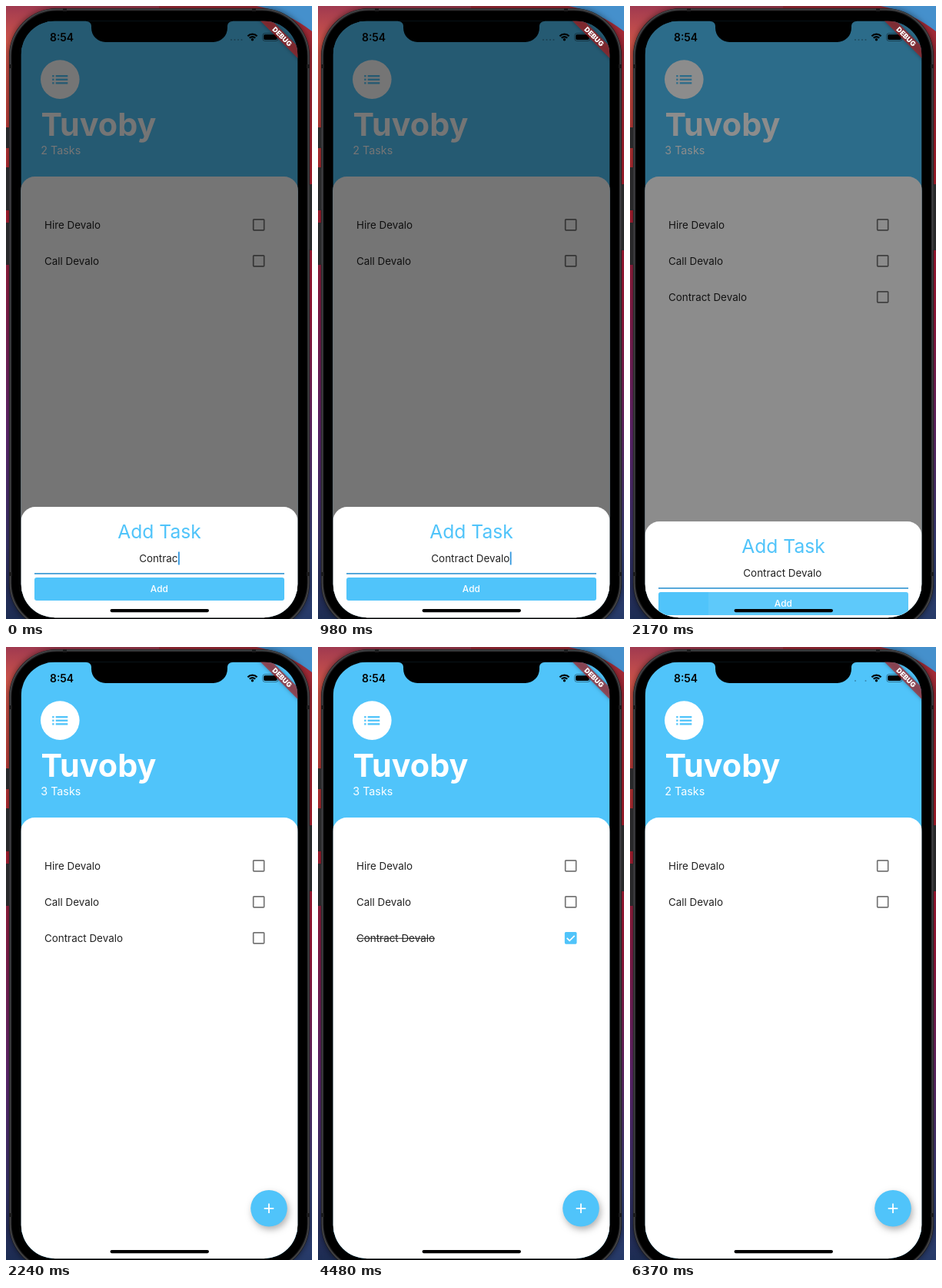
An HTML page with a canvas that plays this animation: 398 px wide and 798 px high, repeating every 6.58 s.

```html
<!DOCTYPE html>
<html lang="en">
<head>
<meta charset="utf-8">
<title>Task list</title>
<style>
  html, body { margin: 0; width: 100%; height: 100%; overflow: hidden; background: #000; }
  canvas { display: block; width: 398px; height: 798px; }
</style>
</head>
<body>
<canvas id="stage" width="398" height="798"></canvas>
<script>
const ctx = document.getElementById('stage').getContext('2d');
const LOOP = 6580, STEP = 70;
const BLUE = '#50c4fa';
const SCREEN = [19.6, 19.6, 359.8, 776.6];
const CORNER = 18.4;
const TASKS = ['Hire Devalo', 'Call Devalo', 'Contract Devalo'];
const NEW_TASK = TASKS[2];

// [time, number of letters in the field]
const TYPING = [[0, 7], [70, 8], [140, 9], [490, 10], [630, 11], [770, 13], [910, 14], [980, 15]];
const ADDED = 2100, CLOSED = 2240, TICK = 4130, REMOVED = 5950;

const clamp = v => Math.max(0, Math.min(1, v));

function box(x, y, w, h, r, fill) {
  ctx.beginPath();
  ctx.roundRect(x, y, w, h, r);
  if (fill) { ctx.fillStyle = fill; ctx.fill(); }
}

function outline(color, width) {
  ctx.strokeStyle = color;
  ctx.lineWidth = width;
  ctx.stroke();
}

function disc(x, y, r, fill) {
  ctx.beginPath();
  ctx.arc(x, y, r, 0, Math.PI * 2);
  ctx.fillStyle = fill;
  ctx.fill();
}

function line(points, color, width) {
  ctx.beginPath();
  points.forEach(([x, y]) => ctx.lineTo(x, y));
  outline(color, width);
}

function label(str, x, y, size, color, weight = 400, align = 'left') {
  ctx.font = `${weight} ${size}px Inter, "Open Sans", sans-serif`;
  ctx.textAlign = align;
  ctx.fillStyle = color;
  ctx.fillText(str, x, y);
  return ctx.measureText(str).width;
}

function gradient(colors) {
  const g = ctx.createLinearGradient(0, 0, 0, 798);
  colors.forEach(([at, c]) => g.addColorStop(at, c));
  return g;
}

function drawWallpaper() {
  ctx.fillStyle = gradient([
    [0, '#a03a50'], [.06, '#d2564a'], [.18, '#c4423c'], [.32, '#b3202f'],
    [.5, '#8c2050'], [.7, '#662a78'], [.88, '#39356f'], [1, '#1c2c52']]);
  ctx.fillRect(0, 0, 199, 798);
  ctx.fillStyle = gradient([
    [0, '#a02c38'], [.3, '#b81f30'], [.5, '#a81a40'],
    [.68, '#6f2a70'], [.88, '#3a4480'], [1, '#263a68']]);
  ctx.fillRect(199, 0, 199, 798);
  ctx.fillStyle = '#4590cc';
  ctx.beginPath();
  ctx.moveTo(326, 0);
  ctx.lineTo(398, 0);
  ctx.lineTo(398, 33);
  ctx.quadraticCurveTo(366, 8, 326, 0);
  ctx.fill();
}

function drawBody() {
  ctx.save();
  ctx.shadowColor = 'rgba(0,0,0,.55)';
  ctx.shadowBlur = 9;
  box(4, 3, 391, 810, 62, '#161617');
  ctx.restore();
  [[158, 27], [210, 56], [282, 55]].forEach(([y, h]) => box(-3, y, 8, h, 2, '#29292b'));
  box(394, 232, 8, 86, 2, '#29292b');
  box(5.6, 4.6, 387.8, 806.8, 60.4);
  outline('#404043', 2);
  box(7.5, 6.5, 384, 803, 59, '#000');
  ctx.fillStyle = '#1b1b1c';
  [[4, 76], [391, 76], [4, 737], [391, 737]].forEach(([x, y]) => ctx.fillRect(x, y, 4, 5));
  [74, 320].forEach(x => ctx.fillRect(x, 3, 5, 4));
}

function drawStatus(dots) {
  label('8:54', 57, 45.5, 13.9, '#000', 600);
  for (let i = 0; i < 4; i++) {
    if (dots === 'all' || (dots === 'few' && (i === 0 || i === 3))) {
      disc(293 + i * 4.5, 44, 1, 'rgba(0,0,0,.3)');
    }
  }
  [8.6, 5.2].forEach(r => {
    ctx.beginPath();
    ctx.arc(320.5, 45.3, r, -Math.PI * .75, -Math.PI * .25);
    outline('#000', 2.2);
  });
  disc(320.5, 43.8, 1.7, '#000');
  box(333.8, 35.5, 20.2, 10, 3);
  outline('rgba(0,0,0,.4)', 1);
  box(335.2, 36.9, 17.4, 7.2, 1.8, '#000');
}

function drawCheckbox(x, y, progress) {
  const fill = clamp(progress * 2), mark = clamp(progress * 2 - 1);
  box(x - 7, y - 7, 14, 14, .8);
  outline(fill ? BLUE : '#757575', 1.7);
  if (!fill) return;
  const half = 7 * fill;
  ctx.fillStyle = BLUE;
  ctx.fillRect(x - half, y - half, half * 2, half * 2);
  if (mark) {
    const a = clamp(mark * 3), b = clamp(mark * 1.5 - .5);
    const path = [[x - 5, y], [x - 5 + 3.5 * a, y + 3.5 * a]];
    if (b) path.push([x - 1.5 + 6.5 * b, y + 3.5 - 6.5 * b]);
    line(path, '#fff', 1.7);
  }
}

function drawTasks(t) {
  const count = t >= ADDED && t < REMOVED ? 3 : 2;
  label(`${count} Tasks`, 45.3, 193.2, 14.3, '#fff');
  box(19, 222, 361, 600, [CORNER, CORNER, 0, 0], '#fff');
  TASKS.slice(0, count).forEach((task, i) => {
    const y = 284.8 + i * 47;
    const ticking = i === 2 && t >= TICK;
    const since = t - TICK;
    if (ticking && since < 350) {
      const alpha = .12 * clamp((350 - since) / 200);
      disc(328.7, y, 20 * clamp((since + STEP) / 140), `rgba(80,196,250,${alpha})`);
    }
    const width = label(task, 50, y + 4.8, 13.4, '#212121');
    if (ticking && since >= STEP) line([[50, y + .5], [50 + width, y + .5]], '#212121', 1);
    drawCheckbox(328.7, y, ticking ? clamp(since / 210) : 0);
  });
}

function drawApp(t) {
  ctx.fillStyle = BLUE;
  ctx.fillRect(...SCREEN);
  disc(70.3, 95.6, 25.3, '#fff');
  ctx.fillStyle = BLUE;
  [90, 94.6, 99.2].forEach(y => {
    ctx.fillRect(60.2, y, 2.3, 2.3);
    ctx.fillRect(64.7, y, 15.6, 2.3);
  });
  label('Tuvoby', 45.6, 169, 41.3, '#fff', 700);
  drawTasks(t);

  ctx.save();
  ctx.shadowColor = 'rgba(0,0,0,.3)';
  ctx.shadowBlur = 8;
  ctx.shadowOffsetY = 4;
  ctx.shadowOffsetX = 2;
  disc(342, 730.8, 23.8, BLUE);
  ctx.restore();
  line([[335.7, 730.8], [348.3, 730.8]], '#fff', 1.8);
  line([[342, 724.5], [342, 737.1]], '#fff', 1.8);
}

function drawSheet(t) {
  const closing = t > ADDED;
  const typed = TYPING.filter(([at]) => t >= at).pop()[1];
  ctx.fillStyle = `rgba(0,0,0,${closing ? .45 : .54})`;
  ctx.fillRect(...SCREEN);

  ctx.save();
  ctx.translate(0, closing ? 19 : 0);
  box(19.6, 652, 359.8, 170, [CORNER, CORNER, 0, 0], '#fff');
  label('Add Task', 199.5, 693, 24.6, BLUE, 400, 'center');
  const width = label(NEW_TASK.slice(0, typed), 198.3, 723.6, 13.4, '#212121', 400, 'center');
  const cursor = clamp(1 - (t - 1610) / 350);
  ctx.fillStyle = `rgba(48,150,222,${cursor})`;
  ctx.fillRect(198.8 + width / 2, 710.5, 1.8, 17);
  ctx.fillStyle = '#459fd6';
  ctx.fillRect(37, 738, 325, 1.8);
  box(37, 744, 325, 30, 3, BLUE);
  if (closing) box(102, 744, 260, 30, [0, 3, 3, 0], 'rgba(255,255,255,.08)');
  label('Add', 199.3, 763.2, 11.8, '#fff', 500, 'center');
  ctx.restore();
}

function drawBanner() {
  ctx.save();
  ctx.translate(379, 20);
  ctx.rotate(Math.PI / 4);
  ctx.shadowColor = 'rgba(0,0,0,.5)';
  ctx.shadowBlur = 5;
  ctx.fillStyle = 'rgba(183,28,28,.63)';
  ctx.fillRect(-40, 22.6, 80, 11);
  ctx.shadowColor = 'transparent';
  label('DEBUG', 0, 31.3, 9, '#fff', 900, 'center');
  ctx.restore();
}

function drawNotch() {
  ctx.beginPath();
  ctx.moveTo(104, 18);
  ctx.lineTo(104, 20);
  ctx.arcTo(111, 20, 111, 27, 6);
  ctx.arcTo(111, 47, 140, 47, CORNER);
  ctx.arcTo(288, 47, 288, 27, CORNER);
  ctx.arcTo(288, 20, 295, 20, 6);
  ctx.lineTo(295, 20);
  ctx.lineTo(295, 18);
  ctx.fillStyle = '#000';
  ctx.fill();
}

function draw(t) {
  drawWallpaper();
  drawBody();
  ctx.save();
  box(...SCREEN, 44);
  ctx.clip();
  drawApp(t);
  if (t < CLOSED) drawSheet(t);
  drawStatus(t < CLOSED ? 'all' : t >= 6160 ? 'few' : 'none');
  drawBanner();
  drawNotch();
  box(135.5, 785, 128.5, 4.2, 2.1, '#000');
  ctx.restore();
}

function tick() {
  const t = performance.now() % LOOP;
  draw(Math.floor(t / STEP) * STEP);
  requestAnimationFrame(tick);
}
tick();
</script>
</body>
</html>
```
